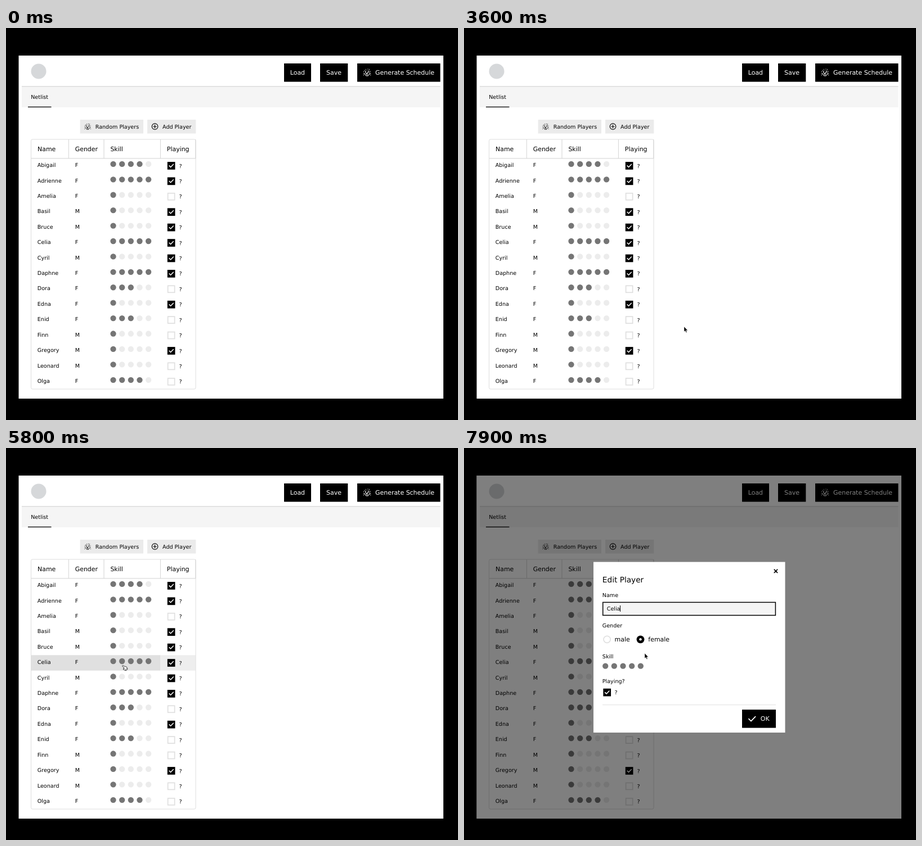
Write an HTML page that moves like this. It is 803x697 px and loops after 8000 ms.

```html
<!DOCTYPE html>
<html lang="en">
<head>
<meta charset="utf-8">
<title>Player list</title>
<style>
  html, body { margin: 0; width: 100%; height: 100%; overflow: hidden; background: #000; }
  svg { display: block; width: 100%; height: 100%; }
  text { font: 9.59px "DejaVu Sans", sans-serif; text-rendering: geometricPrecision; }
  text.m { font-size: 10.96px; }
  text.l { font-size: 13.7px; }
  .line { fill: none; stroke-linecap: round; stroke-linejoin: round; }
</style>
</head>
<body>
<svg id="stage" viewBox="0 0 803 697"></svg>
<script>
const ROW_TOP = 231.2, ROW_H = 27.42;
const players = [
  ['Abigail', 'F', 4, 1], ['Adrienne', 'F', 5, 1], ['Amelia', 'F', 1, 0],
  ['Basil', 'M', 1, 1], ['Bruce', 'M', 1, 1], ['Celia', 'F', 5, 1],
  ['Cyril', 'M', 1, 1], ['Daphne', 'F', 5, 1], ['Dora', 'F', 3, 0],
  ['Edna', 'F', 1, 1], ['Enid', 'F', 3, 0], ['Finn', 'M', 1, 0],
  ['Gregory', 'M', 1, 1], ['Leonard', 'M', 1, 0], ['Olga', 'F', 4, 0]
];

const rect = (x, y, r, b, fill, extra = '') =>
  `<rect x="${x}" y="${y}" width="${r - x}" height="${b - y}" fill="${fill}" ${extra}/>`;
const text = (x, y, str, size = '', fill = '#000') =>
  `<text x="${x}" y="${y}" class="${size}" fill="${fill}">${str}</text>`;
const circle = (x, y, r, fill, extra = '') =>
  `<circle cx="${x}" cy="${y}" r="${r}" fill="${fill}" ${extra}/>`;
const line = (d, color, width, extra = '') =>
  `<path class="line" d="${d}" stroke="${color}" stroke-width="${width}" ${extra}/>`;
const dots = (x, y, filled) => [0, 1, 2, 3, 4].map(i =>
  circle(x + i * 15.65, y, 5.15, i < filled ? '#757575' : '#ececec')).join('');
const tick = (x, y, s, width) =>
  line(`M${x - 3.6 * s} ${y}l${2.5 * s} ${2.5 * s}l${4.8 * s} ${-5 * s}`, '#fff', width);
const checkbox = (x, y, on) => on
  ? rect(x - 6.85, y - 6.85, x + 6.85, y + 6.85, '#000') + tick(x, y, 1, 1.5)
  : rect(x - 6, y - 6, x + 6, y + 6, '#fff', 'stroke="#dfdfdf" stroke-width="1.7"');
const branches = (x, y, s, color) => `<g transform="translate(${x} ${y}) scale(${s})">` +
  line('M7 13.5V8M7 11L4 7V4.5M7 9L10 6V4M5.5 13.5L3 10L1 9M8.5 13.5L11 10L13 9', color, 1.05) +
  line('M1 6v0M2.3 3.6v0M4.8 2v0M7 4.6v0M8.4 1.4v0M11 2v0M12.8 5.5v0M11.4 7.3v0M.8 12v0M13.2 12v0', color, 1.3) + '</g>';

const header = () => rect(22.5, 49, 777, 659, '#fff') +
  circle(58, 77, 13.5, '#d6d8da') +
  rect(28, 104, 771.5, 141, '#f5f5f5') + rect(28, 103.3, 771.5, 104.5, '#d4d4d4') +
  text(44.2, 125.5, 'Netlist') + rect(39, 139.8, 80.5, 141.1, '#000') +
  rect(494, 63, 542, 95.6, '#000') + text(504.8, 82.6, 'Load', 'm', '#fff') +
  rect(558, 63, 607.3, 95.6, '#000') + text(569, 82.6, 'Save', 'm', '#fff') +
  rect(624, 63, 771.5, 95.6, '#000') + branches(634.5, 71.7, 1, '#fff') +
  text(656, 82.6, 'Generate Schedule', 'm', '#fff') +
  rect(131.6, 163, 244, 187.6, '#ebebeb') + branches(139.2, 169.2, .84, '#000') +
  text(158.7, 178.9, 'Random Players') +
  rect(251, 163, 337.3, 187.6, '#ebebeb') +
  circle(264.5, 175.2, 5.3, 'none', 'stroke="#000" stroke-width="1.1"') +
  line('M261.7 175.2h5.6M264.5 172.4v5.6', '#000', 1.1) + text(278, 178.9, 'Add Player');

const table = () =>
  `<g id="hover">${rect(45, 0, 274.5, ROW_H, '#e0e0e0')}${rect(274.5, 0, 337, ROW_H, '#eee')}</g>` +
  rect(44.5, 198, 337, 642, 'none', 'rx="2.7" stroke="#dedede"') +
  rect(45, 231.3, 337, 232.5, '#d9d9d9') +
  [111.3, 174, 274.4, 336.8].map(x => rect(x - .5, 198, x + .5, 232, '#d4d4d4')).join('') +
  [[56, 'Name'], [122.7, 'Gender'], [185.4, 'Skill'], [285.8, 'Playing']]
    .map(([x, label]) => text(x, 218.5, label, 'm')).join('') +
  players.map(([name, gender, skill, plays], i) => {
    const y = ROW_TOP + i * ROW_H;
    return text(55.8, y + 15.9, name) + text(122.8, y + 15.9, gender) +
      dots(190.5, y + 10.7, skill) + checkbox(293.6, y + 13.7, plays) + text(307.4, y + 17.3, '?');
  }).join('');

const dialog = () => rect(230, 202.6, 570.5, 506, '#fff') +
  line('M551.2 216.1l5.5 5.5m0 -5.5l-5.5 5.5', '#000', 1.5) +
  text(245.8, 238.6, 'Edit Player', 'l') + text(245.8, 264.7, 'Name') +
  rect(246.7, 274.4, 553.4, 297.5, '#f5f5f5', 'stroke="#000" stroke-width="1.5"') +
  text(253.7, 289.4, 'Celia') + rect(277, 280, 278, 291, '#000', 'id="caret"') +
  text(245.8, 319.3, 'Gender') +
  circle(254.1, 340.3, 6.1, '#fff', 'stroke="#dfdfdf" stroke-width="1.6"') + text(267.5, 344.2, 'male', 'm') +
  circle(313.5, 340.3, 6.9, '#000') + circle(313.5, 340.3, 2.2, '#fff') + text(327.3, 344.2, 'female', 'm') +
  text(245.8, 374, 'Skill') + `<g id="rating">${dots(251.2, 387.7, 5)}</g>` +
  text(245.8, 417.6, 'Playing?') + checkbox(254.2, 434.6, 1) + text(267.4, 438.2, '?') +
  rect(246, 456.2, 554, 457.2, '#e0e0e0') +
  rect(494, 465.2, 554, 497.6, '#000') + tick(511.7, 481.6, 1.6, 1.7) + text(526.8, 485.1, 'OK', 'm', '#fff');

const cursor = () => `<g id="cursor">
  <path id="arrow" d="M0 0V9L2.1 7.2L3.6 10.5L5 9.9L3.6 6.7H6.4Z" stroke="#fff" stroke-width=".4"/>
  <path id="hand" d="M.6 1.2Q1.4 .2 2.6 1L5.2 2.6Q6.4 1.7 7.2 3Q8.6 2.8 8.8 4.4L10 7L7.2 10L4.4 8.6L2.4 7.6Q1.6 6.6 2.8 6.2L4.2 6.4L3.4 4.2L1 2.5Q.3 2 .6 1.2ZM5.6 9.1L8.8 5.7" fill="#fff" stroke="#000" stroke-width=".8"/></g>`;

document.getElementById('stage').innerHTML = header() + table() +
  rect(22.5, 49, 777, 659, '#000', 'id="shade"') + `<g id="dialog">${dialog()}</g>` + cursor();

const el = Object.fromEntries([...document.querySelectorAll('[id]')].map(e => [e.id, e]));
const show = (node, on) => node.setAttribute('visibility', on ? 'visible' : 'hidden');

// first step, last step, x, y
const moves = [
  [1100, 1800, 463, 362], [1900, 2400, 379, 271], [3100, 3300, 391, 527],
  [3500, 3600, 391, 531], [3700, 3800, 388, 524], [4000, 4100, 344, 363],
  [4300, 4500, 213, 199], [4700, 4800, 202, 228], [5000, 5000, 204, 270],
  [5200, 5300, 205, 343], [5500, 5600, 207, 385], [5800, 5800, 206, 386],
  [6600, 6600, 207, 386], [7200, 7200, 211, 386], [7500, 7500, 252, 386],
  [7700, 7700, 320, 369], [7900, 7900, 321, 365]
];
const hovers = [[0, -1], [5000, 1], [5200, 2], [5300, 3], [5500, 4], [5600, 5], [6400, -1]];
const fades = [[0, 0], [6400, .74], [6600, .98], [6800, 1]];
const valueAt = (steps, t) => steps.filter(s => s[0] <= t).pop()[1];
const within = (t, from, to) => t >= from && t < to;

function cursorAt(t) {
  let x = 563, y = 461;
  for (const [from, to, nx, ny] of moves) {
    if (t < from) break;
    const k = Math.min(1, (t - from + 100) / (to - from + 100));
    x += (nx - x) * k;
    y += (ny - y) * k;
  }
  return [x, y];
}

function draw(t) {
  const row = valueAt(hovers, t), fade = valueAt(fades, t);
  const hand = within(t, 5000, 6400) || within(t, 7500, 7700);
  show(el.hover, row >= 0);
  el.hover.setAttribute('transform', `translate(0 ${ROW_TOP + row * ROW_H})`);
  el.shade.setAttribute('opacity', fade / 2);
  el.dialog.setAttribute('opacity', fade);
  el.dialog.setAttribute('transform', `translate(0 ${13.7 * (1 - fade)})`);
  show(el.caret, !within(t, 7000, 7700));
  const dimmed = within(t, 7500, 7900);
  [...el.rating.children].forEach((dot, i) =>
    dot.setAttribute('fill', dimmed && i ? '#ececec' : '#757575'));
  el.cursor.setAttribute('transform', `translate(${cursorAt(t)})`);
  show(el.arrow, t >= 1000 && !hand);
  show(el.hand, hand);
}

const start = performance.now();
function loop() {
  const t = (performance.now() - start) % 8000;
  draw(Math.floor(t / 100) * 100);
  requestAnimationFrame(loop);
}
loop();
</script>
</body>
</html>
```
